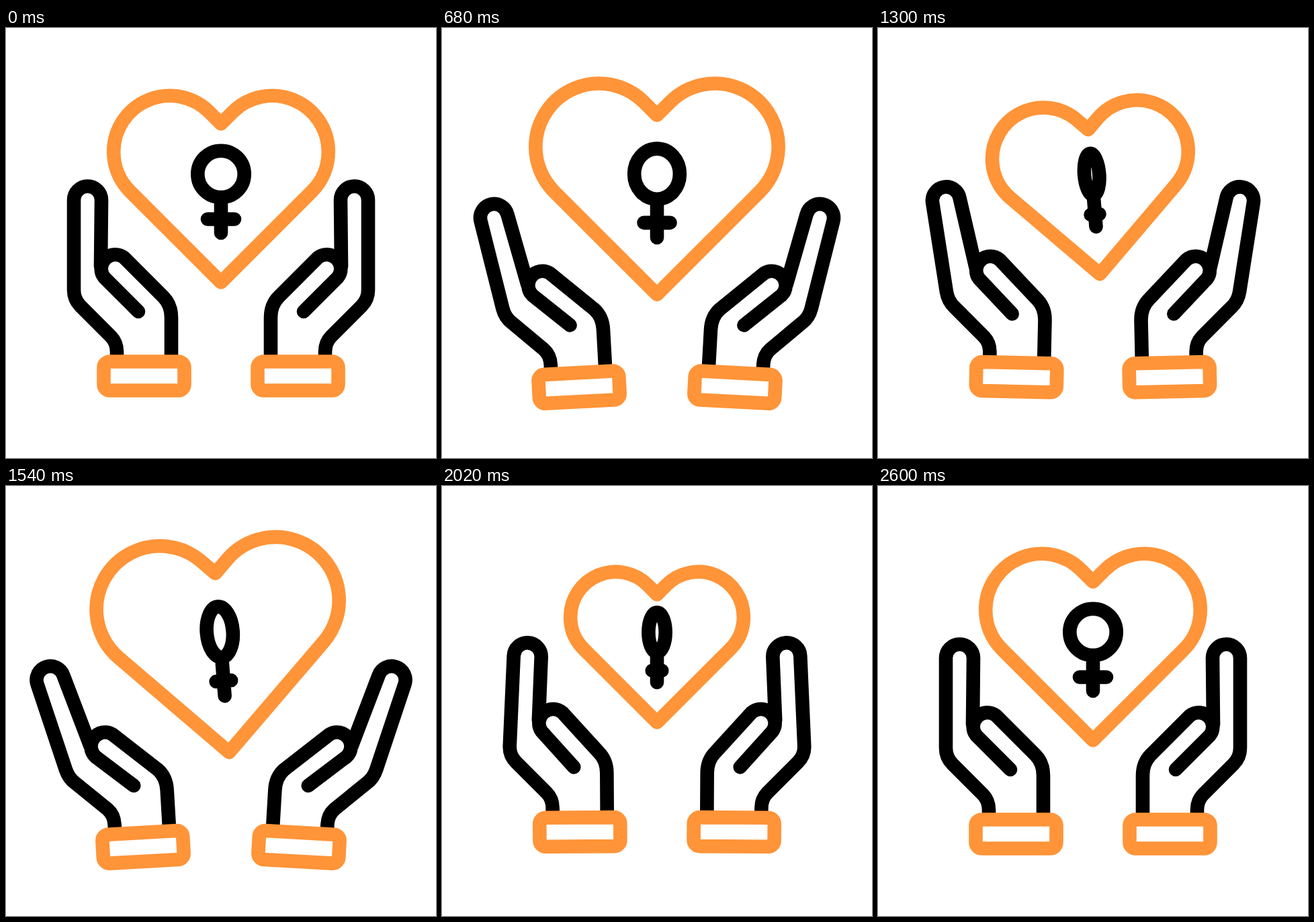
Write an HTML page that moves like this. It is 640 px wide and 640 px high and loops after 2.92 s.

```html
<!DOCTYPE html>
<html lang="en">
<head>
<meta charset="utf-8">
<title>Caring hands</title>
<style>
html, body { margin: 0; width: 100%; height: 100%; overflow: hidden; background: #fff; }
svg { display: block; width: 100vw; height: 100vh; }
path, rect { fill: none; stroke-width: 20.6; stroke-linejoin: round; }
.ink { stroke: #000; }
.warm { stroke: #ff9438; }
.round { stroke-linecap: round; }
</style>
</head>
<body>
<svg viewBox="0 0 640 640">
  <path id="heart" class="warm"/>
  <path id="venus" class="ink round"/>
  <g id="hand">
    <path id="fingers" class="ink round"/>
    <rect id="cuff" class="warm" x="145.5" y="496.5" width="120" height="43" rx="9"/>
  </g>
  <use href="#hand" transform="translate(640 0) scale(-1 1)"/>
</svg>
<script>
const LOOP = 2920, ACTIVE = 2600;
const BEAT = ACTIVE / 6;
const $ = id => document.getElementById(id);
const rad = d => d * Math.PI / 180;
const ease = u => (1 - Math.cos(Math.PI * u)) / 2;

// Eased steps, one per beat; the delay lets parts trail each other.
function steps(delay, keys) {
  const last = keys.length - 1;
  const time = i => i === 0 ? 0 : i === last ? ACTIVE : delay + (i - 1) * BEAT;
  return t => {
    if (t >= ACTIVE) return keys[last];
    let i = 0;
    while (t >= time(i + 1)) i++;
    const u = (t - time(i)) / (time(i + 1) - time(i));
    return keys[i] + (keys[i + 1] - keys[i]) * ease(u);
  };
}

// Two swings out to the same peak, starting and ending at rest.
const swing = (delay, rest, dip, peak, mid, end) =>
  steps(delay, [rest, dip, peak, mid, peak, end, rest]);

const beat = swing(310, 1, .776, 1.15, .86, .804);
const signBeat = swing(350, 1, .777, 1.13, .87, .835);
const lift = swing(360, 0, -19.5, 23.5, 0, -5);
const wrist = swing(365, 0, 3.2, -4.3, 1.6, 0);
const thumb = swing(370, 0, 11.2, -10.5, 2.3, 4.3);
const finger = swing(385, 0, 11.4, -21.8, -8.5, 5.9);
const spin = steps(350, [0, 80, 210, 274, 441, 473, 540]);

function sway(t) {
  const u = Math.min(1, Math.max(0, (t - 960) / 1060));
  return -5.1 * Math.sin(Math.PI * u ** .8) ** 2;
}

function turn([x, y], deg, [ox, oy]) {
  const c = Math.cos(rad(deg)), s = Math.sin(rad(deg));
  return [ox + x * c - y * s, oy + x * s + y * c];
}
const str = p => p[0].toFixed(2) + ' ' + p[1].toFixed(2);

function drawHeart(t) {
  const s = beat(t), r = 83.5 * s;
  const p = (x, y) => str(turn([(x - 320) * s, (y - 240) * s], sway(t), [320, 240]));
  const arc = `A${r} ${r} 0 0 0 `;
  $('heart').setAttribute('d', `M${p(320, 142.5)}L${p(302.5, 125)}${arc}${p(160.2, 184)}${arc}${p(184.5, 243)}`
    + `L${p(320, 378.5)}L${p(455.5, 243)}${arc}${p(479.8, 184)}${arc}${p(337.5, 125)}Z`);
}

function drawVenus(t) {
  const sy = signBeat(t), sx = Math.abs(Math.cos(rad(spin(t))));
  const p = (x, y) => str(turn([x * sx, (y - 220) * sy - 20], sway(t), [320, 240]));
  const arc = `A${34.7 * sx} ${34.7 * sy} ${sway(t)} 0 1 `;
  $('venus').setAttribute('d', `M${p(0, 182.7)}${arc}${p(0, 252.1)}${arc}${p(0, 182.7)}Z`
    + `M${p(0, 252.1)}L${p(0, 305)}M${p(-20, 284.5)}L${p(20, 284.5)}`);
}

function drawHand(t) {
  const a = wrist(t), dy = lift(t), b = finger(t), c = thumb(t);
  const base = (x, y, sink = 0) => turn([x - 205.5, y - 545], a, [205.5, 545 + dy - sink * b]);
  const low = (x, y) => str(base(x, y));
  const palm = (x, y) => str(base(x, y, .22));
  const knuckle = base(101, 404, .33), tip = base(197, 422, .22);
  const f = (x, y) => str(turn([x - 101, y - 404], b, knuckle));
  const th = (x, y) => str(turn([x - 197, y - 422], c, tip));
  $('fingers').setAttribute('d',
    `M${low(165, 492)}L${low(165, 482)}Q${low(165, 468)} ${low(156, 459)}`
    + `L${palm(111, 414)}Q${str(knuckle)} ${f(101, 390)}L${f(101, 256)}`
    + `A20.5 20.5 0 0 1 ${f(142, 256)}L${th(141, 355)}`
    + `M${str(tip)}L${th(146.2, 371.2)}A21 21 0 0 1 ${th(175.8, 341.8)}`
    + `L${palm(234, 400)}Q${palm(246, 412)} ${palm(246, 431)}L${low(246, 492)}`);
  $('cuff').setAttribute('transform', `translate(0 ${dy}) rotate(${a} 205.5 545)`);
}

function draw(now) {
  const t = now % LOOP;
  drawHeart(t);
  drawVenus(t);
  drawHand(t);
}

let start;
function tick(now) {
  if (start === undefined) start = now;
  draw(Math.max(0, now - start));
  requestAnimationFrame(tick);
}
draw(0);
requestAnimationFrame(tick);
</script>
</body>
</html>
```
